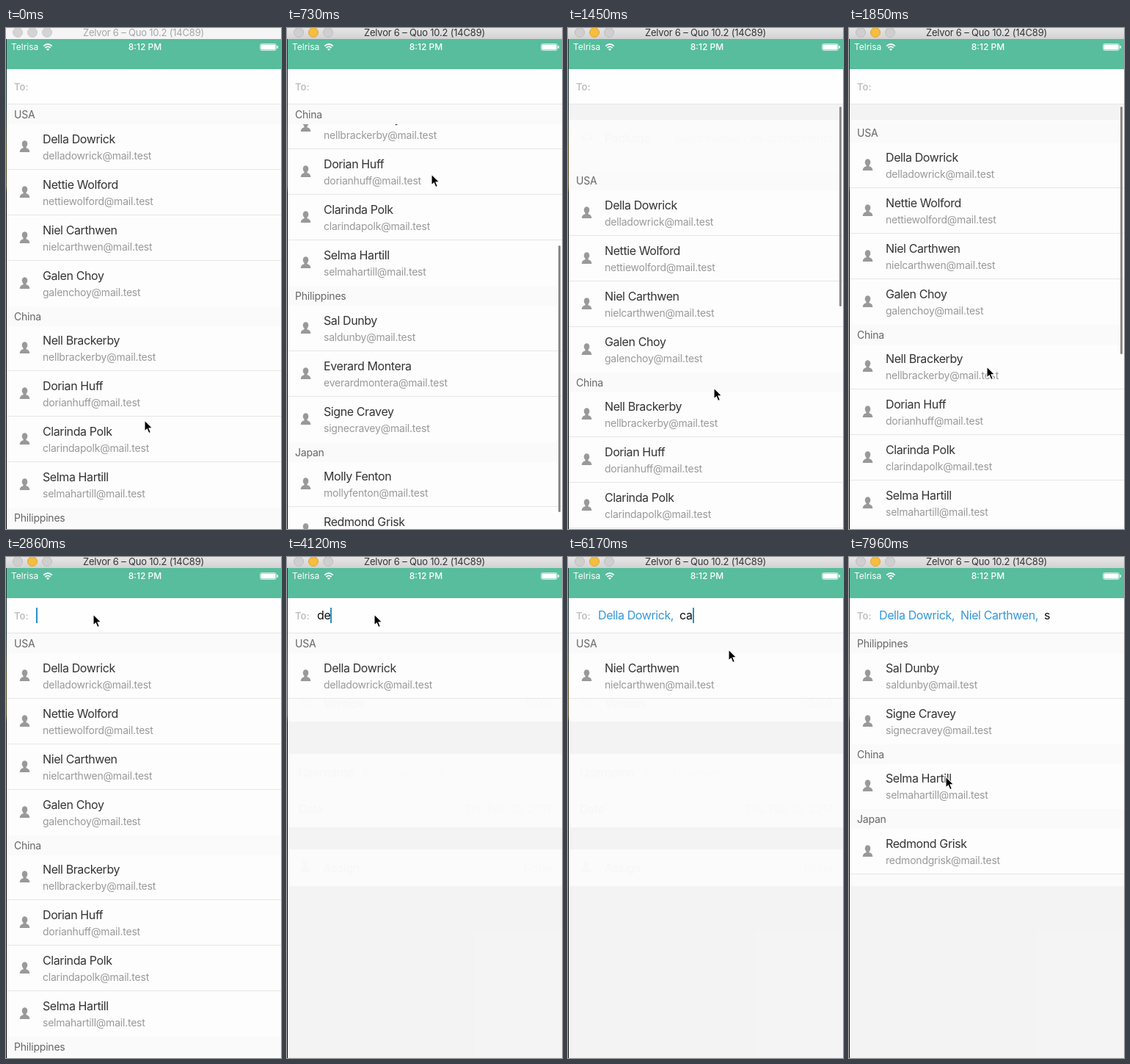
An HTML page for the animation above (7990 ms loop, 375 by 682 pixels).

```html
<!DOCTYPE html>
<html lang="en">
<head>
<meta charset="utf-8">
<title>Contact picker</title>
<style>
html, body { margin: 0; width: 100%; height: 100%; overflow: hidden; background: #e8e8e8; }
body { position: relative; font: 16px/20px Inter, "Open Sans", sans-serif; letter-spacing: -.4px; color: #333; }
div, span, svg { box-sizing: border-box; white-space: pre; }
#stage { position: absolute; left: 0; top: 0; width: 375px; height: 682px; overflow: hidden; background: #e8e8e8; }
#stage > div, #stage > svg, .abs, .cell, .cell > *, .row, .row > *, .head { position: absolute; }

#title { left: 0; top: 0; width: 375px; height: 15px; background: linear-gradient(#e6e6e6, #d2d2d2);
  font-size: 13px; line-height: 12px; letter-spacing: -.2px; text-align: center; }
#title.idle { background: #f5f5f5; color: #a5a5a5; }
.dot { position: absolute; top: -1px; width: 12px; height: 12px; border-radius: 50%; background: #cfcfcf; border: 1px solid #bdbdbd; }
.dot.min { background: #f6bd3e; border-color: #dfa433; }
.idle .dot { background: #d4d4d4; border-color: #cacaca; }

#nav { left: 0; top: 15px; width: 375px; height: 41px; background: #57bd9c; color: #fff; font-size: 12px; letter-spacing: 0; }
#nav span { position: absolute; top: 1px; }
#edge { left: 0; top: 15px; width: 1px; height: 667px; background: linear-gradient(#1d3434 90px, #4d4a24 150px 200px, #0a0a0a 210px); }

#field { left: 0; top: 56px; width: 375px; height: 48px; background: #fefefe; border-bottom: 1px solid #e6e6e6; }
#to { left: 11px; top: 14px; font-size: 13px; font-weight: 600; letter-spacing: 0; color: #bfbfbf; }
#entry { left: 41px; top: 13px; height: 21px; line-height: 21px; display: flex; color: #111; }
#entry b { font-weight: 400; color: #3498db; margin-right: 8px; }
#caret { width: 2px; height: 21px; background: #2f8fc4; }

#form { left: 0; top: 0; width: 375px; height: 682px; }
.cell { left: 0; width: 375px; background: #fff; border-bottom: 1px solid #dedede; }
.cell > span { top: 15px; }
.val { right: 14px; color: #999; }
#form.dim span, #form.dim svg { opacity: .06; }
#form.dim .cell { border-color: #fff; }

#list { left: 0; top: 104px; width: 375px; height: 578px; overflow: hidden; background: rgba(250, 250, 250, .68); }
.head { left: 0; width: 375px; height: 27px; padding-left: 11px; line-height: 27px; font-size: 14px;
  letter-spacing: -.2px; color: #666; background: #fafafa; z-index: 1; }
.row { left: 0; width: 375px; height: 62px; background: #fdfdfd; border-bottom: 1px solid #e6e6e6; }
.row.last { border-color: transparent; }
.row.hit { background: #e2e2e2; }
.row span { left: 50px; top: 10px; }
.row .mail { top: 33px; font-size: 14px; letter-spacing: -.22px; color: #999; }
.row svg { left: 18px; top: 22px; }
#bar { left: 370px; width: 3px; border-radius: 2px; background: #8a8a8a; }
</style>
</head>
<body>
<div id="stage">
  <div id="form"></div>
  <div id="list"></div>
  <div id="bar"></div>
  <div id="field">
    <span id="to" class="abs">To:</span>
    <div id="entry" class="abs"><span id="picked"></span><span id="typed"></span><span id="caret"></span></div>
  </div>
  <div id="nav">
    <span style="left:7px">Telrisa</span>
    <svg class="abs" style="left:50px;top:5px" width="14" height="12" fill="none" stroke="#fff" stroke-width="1.7">
      <path d="M1.2 4.6Q7 -.6 12.8 4.6M3.4 7Q7 3.8 10.6 7"/><path d="M7 11L4.9 8.8Q7 7.2 9.1 8.8Z" fill="#fff" stroke="none"/>
    </svg>
    <span style="left:0;width:379px;text-align:center;font-weight:500">8:12 PM</span>
    <svg class="abs" style="left:346px;top:6px" width="26" height="10" fill="#fff">
      <rect x=".5" y=".5" width="22" height="9" rx="2" fill="none" stroke="#c6e9dd"/>
      <rect x="1.5" y="1.5" width="20" height="7" rx="1"/><rect x="23.5" y="3" width="1.5" height="4" rx=".7"/>
    </svg>
  </div>
  <div id="edge"></div>
  <div id="title">Zelvor 6 – Quo 10.2 (14C89)<i class="dot" style="left:9px"></i><i class="dot min" style="left:29px"></i><i class="dot" style="left:49px"></i></div>
  <svg id="mouse" width="14" height="21" style="left:-1px;top:-1px">
    <path d="M1 1V16L4.4 12.9L6.8 18.6L9.4 17.5L7 11.9H11.8Z" fill="#000" stroke="#fff" stroke-width="1.1"/>
  </svg>
</div>
<script>
const LOOP = 7990, ROW = 62, HEAD = 26.5;
const $ = id => document.getElementById(id);

const groups = {
  USA: ["Della Dowrick", "Nettie Wolford", "Niel Carthwen", "Galen Choy"],
  China: ["Nell Brackerby", "Dorian Huff", "Clarinda Polk", "Selma Hartill"],
  Philippines: ["Sal Dunby", "Everard Montera", "Signe Cravey"],
  Japan: ["Molly Fenton", "Redmond Grisk"]
};
const people = Object.entries(groups).flatMap(([group, names]) => names.map(name => ({ group, name })));
const picks = ["Della Dowrick", "Niel Carthwen"];

const person = `<svg width="15" height="17" fill="#999"><ellipse cx="7.5" cy="4.8" rx="3.8" ry="4.6"/>
<path d="M5.5 8H9.5V10.2Q14.3 11.4 14.3 16H.7Q.7 11.4 5.5 10.2Z"/></svg>`;
const code = `<svg width="18" height="12" fill="none" stroke="#8e8e8e" stroke-width="2"><path d="M7 1.5L2.2 6L7 10.5M11 1.5L15.8 6L11 10.5"/></svg>`;
const tag = `<svg width="17" height="17" fill="none" stroke="#999" stroke-width="1.2"><path d="M1.5 1.5H7.5L15.5 9.5L9.5 15.5L1.5 7.5Z"/><circle cx="4.8" cy="4.8" r="1.3"/></svg>`;

const cell = (top, h, label, value, icon = "", x = 16, y = 14) =>
  `<div class="cell" style="top:${top}px;height:${h}px">${icon.replace("<svg", `<svg style="left:17px;top:${y}px"`)}` +
  `<span style="left:${x}px">${label}</span>${value}</div>`;
const val = text => `<span class="val">${text}</span>`;
$("form").innerHTML =
  cell(125, 49, "Package", val("react-native-cell-components"), code, 50, 17) +
  cell(174, 50, "Version", val("0.0.0"), tag, 50, 15) +
  `<span class="abs" style="left:11px;top:241px;font-size:12px;letter-spacing:0;color:#c6c6c6">USER INFO</span>` +
  cell(268, 50, "Username", `<span style="left:103px;color:#c7c7cb">Enter username</span>`) +
  cell(318, 50, "Date", val("Thu Feb 23 2017")) +
  cell(398, 50, "Assign", val("None"), person, 50, 15);

// Steps: start, picked count, typed text, list query (null hides the list), row pressed
const steps = [
  [0, 0, "", ""], [3160, 0, "d", ""], [3250, 0, "d", "d"], [3400, 0, "de", "d"], [3540, 0, "de", "de"],
  [4720, 0, "de", "de", true], [4860, 1, "", null],
  [5445, 1, "c", null], [5590, 1, "c", "c"], [5640, 1, "ca", "c"], [5700, 1, "ca", "ca"],
  [6640, 1, "ca", "ca", true], [6800, 2, "", null],
  [7170, 2, "s", null], [7260, 2, "s", "s"]
];

// Tracks: time followed by values, linear in between
const pointer = [
  [100, 189, 534], [790, 198, 168], [840, 198, 170], [1450, 199, 490], [1620, 199, 520], [1760, 199, 520],
  [2440, 119, 78], [4120, 119, 78], [4560, 159, 152], [4860, 160, 145], [4960, 163, 126], [5140, 219, 126],
  [6170, 219, 126], [6420, 205, 162], [7530, 205, 162], [7960, 132, 299]
];
const drag = [[100, 0], [795, 333], [840, 333], [1300, 0], [1450, -90], [1620, -104]];
const barFade = [[100, 0], [160, 1], [2150, 1], [2440, 0]];
const caretFade = [
  [2859, 0], [2860, 1], [5290, 1], [5370, 0], [5440, 0], [5445, 1], [6170, 1], [6280, 0],
  [6340, 0], [6420, 1], [7530, 1], [7620, 0]
];

function at(track, t) {
  const i = track.findIndex(k => k[0] > t);
  if (i < 0) return track[track.length - 1].slice(1);
  if (i === 0) return track[0].slice(1);
  const a = track[i - 1], b = track[i], p = (t - a[0]) / (b[0] - a[0]);
  return a.slice(1).map((v, n) => v + (b[n + 1] - v) * p);
}

function scrollAt(t) {
  const bounce = Math.min(1, Math.max(0, (t - 1670) / 480));
  return at(drag, t)[0] * (1 - bounce) ** 3;
}

function findPeople(query, count) {
  if (!query) return people;
  return people
    .filter(p => p.name.toLowerCase().includes(query) && !picks.slice(0, count).includes(p.name))
    .sort((a, b) => a.name.length - b.name.length);
}

let sections = [], total = 0;
function buildList(query, count, hit) {
  const found = findPeople(query, count), names = [...new Set(found.map(p => p.group))];
  let y = 0, html = "";
  sections = names.map((group, g) => {
    const top = y, members = found.filter(p => p.group === group);
    y += HEAD;
    members.forEach((p, i) => {
      const last = i === members.length - 1 && g < names.length - 1;
      const mail = p.name.toLowerCase().replace(" ", "") + "@mail.test";
      html += `<div class="row${last ? " last" : ""}${hit && !g && !i ? " hit" : ""}" style="top:${Math.round(y)}px">` +
        `${person}<span>${p.name}</span><span class="mail">${mail}</span></div>`;
      y += ROW;
    });
    html += `<div class="head">${group}</div>`;
    return { top, end: y };
  });
  total = y;
  $("list").innerHTML = `<div class="abs" style="left:0;top:0">${html}</div>`;
}

let shown = null;
function applyStep(step) {
  if (step === shown) return;
  shown = step;
  const [, count, text, query, hit] = step, open = query !== null;
  $("picked").innerHTML = picks.slice(0, count).map(n => `<b>${n},</b>`).join("");
  $("typed").textContent = text;
  $("list").style.display = open ? "" : "none";
  $("form").className = open ? "dim" : "";
  if (open) buildList(query, count, hit);
}

function render(t) {
  applyStep(steps.filter(s => s[0] <= t).pop());
  const scroll = scrollAt(t);
  if (shown[3] !== null) {
    $("list").firstChild.style.transform = `translateY(${Math.round(-scroll)}px)`;
    $("list").querySelectorAll(".head").forEach((head, i) => {
      const { top, end } = sections[i];
      head.style.top = Math.round(Math.max(top, Math.min(scroll, end - HEAD))) + "px";
    });
  }
  const bar = $("bar").style, track = 571;
  bar.opacity = at(barFade, t)[0];
  bar.top = 107 + track * Math.max(scroll, 0) / total + "px";
  bar.height = track * 579 / total + Math.min(scroll, 0) + "px";
  $("caret").style.opacity = at(caretFade, t)[0];
  $("title").className = t < 60 ? "idle" : "";
  const [x, y] = at(pointer, t);
  $("mouse").style.transform = `translate(${Math.round(x)}px, ${Math.round(y)}px)`;
}

function tick() {
  render(performance.now() % LOOP);
  requestAnimationFrame(tick);
}
tick();
</script>
</body>
</html>
```
